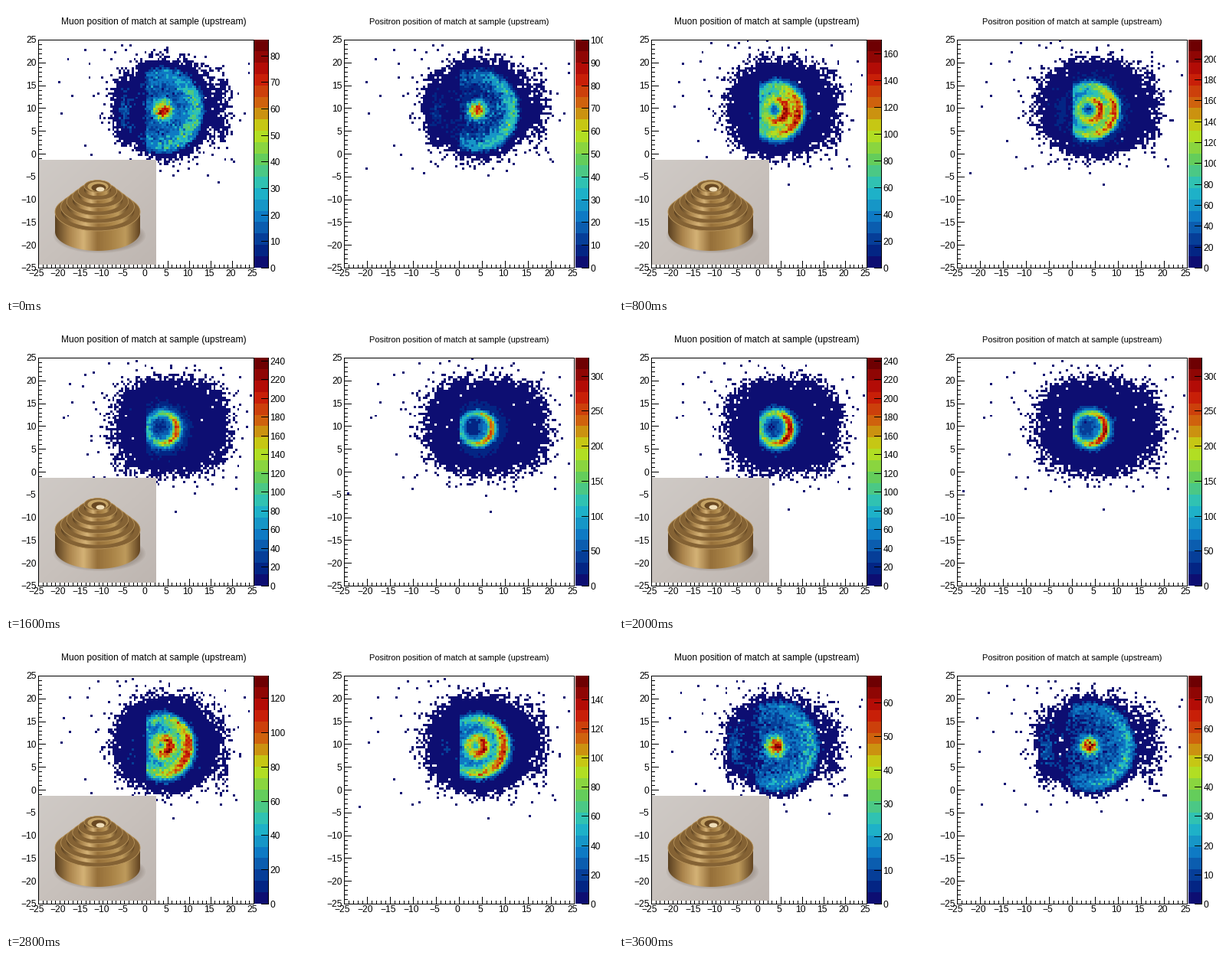
A matplotlib script for the animation above (4000 ms loop, 792 px wide and 379 px high).

```python
import numpy as np
import matplotlib.pyplot as plt
from matplotlib.animation import FuncAnimation
from matplotlib.colors import LinearSegmentedColormap, ListedColormap
from matplotlib.patches import Ellipse, PathPatch, Rectangle
from matplotlib.path import Path

W, H, DPI = 792, 379, 100
TOP, BOTTOM = 44.5, 342.5
LEVELS, BINS, LAST = 20, 100, 9
EDGES = np.linspace(-25, 25, BINS + 1)
MID = (EDGES[:-1] + EDGES[1:]) / 2
X, Y = np.meshgrid(MID, MID)

plt.rcParams["font.family"] = "Liberation Sans"
fig = plt.figure(figsize=(W / DPI, H / DPI), dpi=DPI, facecolor="white")
ax = fig.add_axes([0, 0, 1, 1])
ax.set_axis_off()


def rgb(*c):
    return tuple(v / 255 for v in c)


STOPS = [(0, 0, 99), (5, 48, 142), (15, 124, 198), (35, 192, 201),
         (102, 206, 90), (196, 226, 22), (208, 97, 13), (199, 16, 8), (110, 0, 2)]
rainbow = LinearSegmentedColormap.from_list("rainbow", [rgb(*s) for s in STOPS])
colors = rainbow((np.arange(LEVELS) + 0.99) / LEVELS)
colors[0, :3] = rgb(13, 14, 114)
palette = ListedColormap(colors)
palette.set_bad((1, 1, 1, 0))


# ---------------------------------------------------------------- drawing helpers
def label(x, y, s, px=12, ha="center"):
    return ax.text(x, y, s, fontsize=px * 72 / DPI, ha=ha, va="baseline",
                   color="black", zorder=8)


def line(x0, y0, x1, y1, z=6):
    """One pixel wide line through pixel centres."""
    xs, ys = np.floor([x0, x1]) + 0.5, np.floor([y0, y1]) + 0.5
    return ax.plot(xs, ys, color="black", lw=72 / DPI, zorder=z, snap=False,
                   solid_capstyle="projecting")[0]


def cells(data, x0, x1, z):
    return ax.imshow(data, cmap=palette, vmin=0, vmax=LEVELS, origin="lower",
                     extent=(x0, x1, BOTTOM, TOP), interpolation="nearest",
                     aspect="auto", zorder=z)


def number(v):
    return f"{v:d}".replace("-", "\u2212")


# ---------------------------------------------------------------- event model
CX, CY = 3.65, 9.5


def bell(d, s):
    return np.exp(-0.5 * (d / s) ** 2)


def step_down(d, soft):
    return 1 / (1 + np.exp(d / soft))


def make_tracks():
    """Straight tracks outside the rings: places at the first and last plane."""
    rng = np.random.default_rng(7)
    n = 1050
    ang = rng.uniform(0, 2 * np.pi, n)
    c, s = np.cos(ang), np.sin(ang)
    rad = 9.3 + 2.5 * np.abs(rng.normal(size=n))
    rad /= (np.abs(c) ** 2.5 + np.abs(s) ** 2.5) ** 0.4
    halo = np.column_stack([5 + 1.03 * rad * c, 10.5 + 0.78 * rad * s])
    stray = rng.uniform((-21, -6), (24, 24), (60, 2))
    stray = stray[np.hypot((stray[:, 0] - 5) / 16, (stray[:, 1] - 10) / 13) > 1]
    centre = np.array([5, 10])
    halo_end = centre + (halo - centre) * 0.93 + rng.normal(0, 1.1, halo.shape)
    stray_end = stray + rng.normal(0, 2.5, stray.shape)
    return np.vstack([halo, stray]), np.vstack([halo_end, stray_end])


START, END = make_tracks()


def rate(k, peak, blur):
    """Expected counts per bin: an inner ring grows while the outer one shrinks."""
    t = k / LAST
    mix = lambda a, b: a + (b - a) * t
    r = np.hypot(X - CX, Y - CY)
    ang = np.arctan2(Y - CY, X - CX)
    low = mix(0.3, 0.42)
    side = low + (1 - low) * ((1 + np.cos(ang + 0.26)) / 2) ** 1.5

    u = min(k / 8, 1)
    inner = 3.4 * u * u * (3 - 2 * u)
    outer = max(9.1 - 0.68 * k, 3.4)
    swell = np.sin(np.pi * t)
    d = r - outer
    width = np.where(d < 0, mix(1.8, 0.5), 0.65) * blur
    ring = (0.22 + 0.38 * swell ** 2) * bell(d, width) + 0.17 * t * bell(d, 1.8)
    spot = (0.8 - 0.45 * t * t) * bell(r - inner, mix(1.25, 0.45) * blur)
    fill = (0.09 + 0.08 * swell) * step_down(d, 0.3)

    left = X < 0
    shape = (ring * side + spot * side ** t) * np.where(left, 0.1, 1)
    shape += fill * side ** 0.5 * np.where(left, max(0.7 - 0.2 * k, 0.1), 1)
    shape += 0.1 * (1 - t) * left * bell(X - CX + outer + 0.7, 0.8) * bell(Y - 9, 3.2)

    # Faint body under everything, round at first and boxier later.
    e = mix(2, 3)
    rho = (np.abs((X - mix(3.4, 5.8)) / mix(10.2, 11.6)) ** e
           + np.abs((Y - 9.8) / mix(9.9, 9.3)) ** e) ** (1 / e)
    body = 3.8 * step_down(rho - 1, mix(0.05, 0.09))
    body *= 1 - 0.7 * (1 - t) * bell(X + 2.5, 0.9)
    strip = 1.4 * bell(X - 17, 1.1) * bell(Y - 9.5, 4.5)
    return peak * shape + body + strip


def histogram(k, peak, blur, seed):
    rng = np.random.default_rng([seed, k])
    counts = rng.poisson(rate(k, peak, blur)).astype(float)
    pts = START + (END - START) * k / LAST
    counts += np.histogram2d(pts[:, 1], pts[:, 0], bins=[EDGES, EDGES])[0]
    level = np.minimum(np.floor(counts / peak * LEVELS), LEVELS - 1)
    return np.ma.masked_where(counts == 0, level)


# ---------------------------------------------------------------- panels
KEY_PLANES = (0, 1, 2, 3, 4, 7, 8)


def tick_step(top):
    raw = top / 10
    power = 10 ** np.floor(np.log10(raw))
    nice = next(n for n in (1, 2.5, 5, 10) if raw / power <= n)
    return int(int(nice) * power)


class Panel:
    def __init__(self, x0, x1, bar, title, title_x, title_px, peaks, blur, seed):
        self.bar, self.scale = bar, []
        self.peaks = np.interp(range(LAST + 1), KEY_PLANES, peaks)
        self.maps = [histogram(k, p, blur, seed) for k, p in enumerate(self.peaks)]
        self.image = cells(self.maps[0], x0, x1, 2)
        cells(np.arange(LEVELS)[:, None] + 0.5, *bar, 3)
        label(title_x, 24, title, title_px)
        for y in (TOP, BOTTOM):
            line(x0, y, x1, y)
        for x in (x0, x1, bar[1]):
            line(x, TOP, x, BOTTOM)
        for v in range(-25, 26):
            x = x0 + (v + 25) / 50 * (x1 - x0)
            y = BOTTOM - (v + 25) / 50 * (BOTTOM - TOP)
            major = v % 5 == 0
            size = 9 if major else 4
            line(x, BOTTOM, x, BOTTOM - size, 4)
            line(x0, y, x0 + size, y, 4)
            if major:
                label(x - 2.5, 353, number(v))
                label(x0 - 3, y + 4, number(v), ha="right")

    def show(self, k):
        self.image.set_data(self.maps[k])
        for artist in self.scale:
            artist.remove()
        self.scale = []
        top, right = self.peaks[k], self.bar[1]
        for v in range(0, int(top) + 1, tick_step(top)):
            y = BOTTOM - v / top * (BOTTOM - TOP)
            self.scale += [line(right - 9, y, right, y),
                           label(right + 2, y + 4.5, number(v), ha="left")]


# ---------------------------------------------------------------- inset picture
def gradient(stops, extent, z, clip=None, diagonal=False):
    cmap = LinearSegmentedColormap.from_list("g", [rgb(*c) for c in stops])
    u = np.linspace(0, 1, 120)
    data = (u[None, :] + u[:, None]) / 2 if diagonal else u[None, :]
    im = ax.imshow(data, cmap=cmap, vmin=0, vmax=1, extent=extent,
                   aspect="auto", interpolation="bilinear", zorder=z)
    if clip is not None:
        im.set_clip_path(clip)


def tier(cx, cy, rx, ry, h, z):
    a = np.linspace(0, np.pi, 50)
    low = np.column_stack([cx + rx * np.cos(a), cy + h + ry * np.sin(a)])
    high = np.column_stack([cx - rx * np.cos(a), cy - ry * np.sin(a)])
    wall = PathPatch(Path(np.vstack([low, high, low[:1]])), fc="none", ec="none")
    ax.add_patch(wall)
    gradient([(92, 66, 34), (170, 132, 76), (212, 178, 118), (150, 112, 58),
              (168, 130, 70), (190, 154, 92), (100, 70, 34)],
             (cx - rx, cx + rx, cy + h + ry, cy - ry), z, wall)
    ax.add_patch(Ellipse((cx, cy), 2 * rx, 2 * ry, fc=rgb(132, 98, 52),
                         ec=rgb(186, 150, 92), lw=0.6, zorder=z + 0.01))


def draw_inset():
    gradient([(207, 202, 198), (200, 193, 188), (190, 182, 177)],
             (43, 196, 338, 201), 5, diagonal=True)
    for grow in range(4):
        ax.add_patch(Ellipse((122, 300), 108 + 4 * grow, 40 + 2 * grow,
                             fc=rgb(120, 106, 94), alpha=0.1, ec="none", zorder=5.1))
    for i in range(6):
        rx = 55.5 - 7.6 * i
        tier(119.5, 269 - 6.7 * i, rx, 0.45 * rx, 5 if i else 26, 5.2 + 0.05 * i)
    for x, y, w, h, c in ((120, 236, 27, 13, (196, 162, 100)),
                          (121, 237.5, 19, 10, (104, 72, 34)),
                          (123, 239.5, 11, 6, (240, 222, 184))):
        ax.add_patch(Ellipse((x, y), w, h, fc=rgb(*c), ec="none", zorder=5.6))


TITLE = "{} position of match at sample (upstream)"
panels = [
    Panel(42.5, 323.5, (324, 342.5), TITLE.format("Muon"), 192.5, 12,
          (68, 86, 106, 112, 133, 244, 243), 1.2, 3),
    Panel(441.5, 741.5, (743, 760.5), TITLE.format("Positron"), 591, 11,
          (78, 100, 106, 116, 156, 342, 326), 1.0, 4),
]
draw_inset()
ax.add_patch(Rectangle((779, 0), 13, H, fc="white", ec="none", zorder=9))
ax.set_xlim(0, W)
ax.set_ylim(H, 0)

# Forward through the planes and back, resting one extra step at each end.
ORDER = [*range(1, LAST + 1), *range(LAST, -1, -1), 0]


def draw(i):
    for panel in panels:
        panel.show(ORDER[i])


anim = FuncAnimation(fig, draw, frames=len(ORDER), interval=200,
                     repeat=True, repeat_delay=0, blit=False)
plt.show()
```
